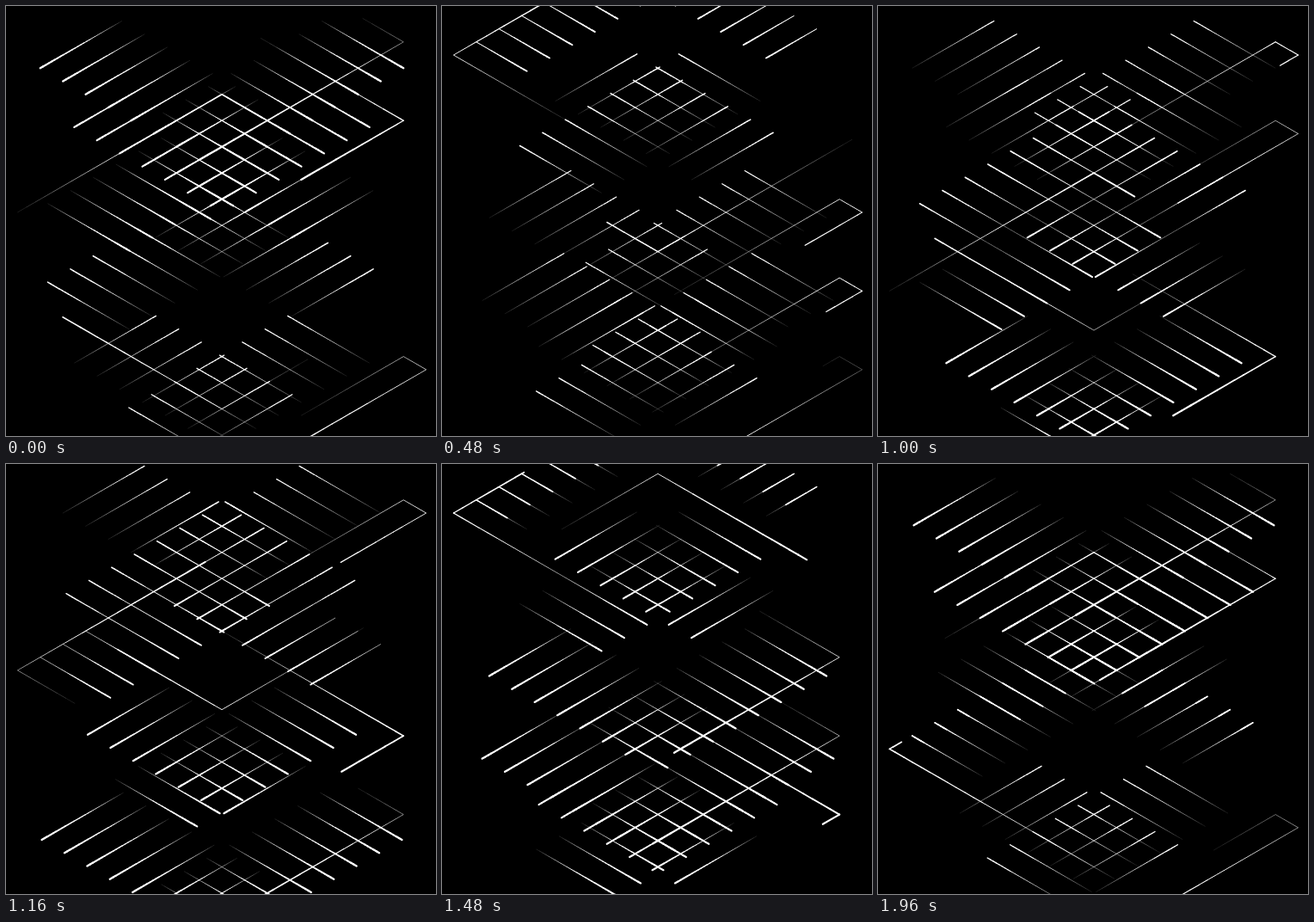
These frames come from a looping animation (500 px wide and 500 px high, 2 s). An HTML page with a canvas:

```html
<!DOCTYPE html>
<html>
<head>
<meta charset="utf-8">
<style>
html, body { margin: 0; width: 100%; height: 100%; overflow: hidden; background: #000; }
canvas { display: block; }
</style>
</head>
<body>
<canvas id="stage" width="500" height="500"></canvas>
<script>
const ctx = document.getElementById('stage').getContext('2d');
const LOOP = 2000, STEP = 40, LAG = 200;
const UX = 26.4, UY = 15.24, X0 = 251, Y0 = 41.8;
const DASH = 0.2, PIECES = 28;

// Each diamond spans -2..16 on two oblique axes (a: down-right, b: down-left).
const project = ([a, b], row) => [X0 + (a - b) / 2 * UX, Y0 + ((a + b) / 2 + 6 * row) * UY];

function makePath(points) {
  const at = [0];
  for (let i = 1; i < points.length; i++) {
    const [a, b] = points[i], [c, d] = points[i - 1];
    at.push(at[i - 1] + Math.abs(a - c) + Math.abs(b - d));
  }
  return { points, at, length: at[at.length - 1] };
}

// Rays run to the far side and back; the border is one long closed circuit.
const paths = [makePath([[14, 16], [14, -2], [-2, -2], [-2, 16], [16, 16], [16, -2], [14, -2], [14, 16]])];
for (let j = 0; j <= 14; j += 2) {
  paths.push(makePath([[16, j], [-2, j], [16, j]]));
  if (j < 14) paths.push(makePath([[j, 16], [j, -2], [j, 16]]));
}

function pointAt({ points, at }, s) {
  let i = 1;
  while (i < at.length - 1 && s > at[i]) i++;
  const k = (s - at[i - 1]) / (at[i] - at[i - 1]);
  return points[i].map((v, n) => points[i - 1][n] + (v - points[i - 1][n]) * k);
}

// A dash that tapers from its thick trailing end to a hairline.
function drawDash(path, row, e) {
  const from = (1 - DASH) * e * path.length, size = DASH * path.length;
  const stops = path.at.filter(s => s > from && s < from + size);
  for (let i = 0; i <= PIECES; i++) stops.push(from + size * i / PIECES);
  stops.sort((p, q) => p - q);
  const thick = 2.3 - 1.15 * e;
  for (let i = 1; i < stops.length; i++) {
    const q = ((stops[i] + stops[i - 1]) / 2 - from) / size;
    ctx.lineWidth = thick * (1 - q) + 0.08;
    ctx.lineCap = ctx.lineWidth > 1 ? 'round' : 'butt';
    ctx.beginPath();
    ctx.moveTo(...project(pointAt(path, stops[i - 1]), row));
    ctx.lineTo(...project(pointAt(path, stops[i]), row));
    ctx.stroke();
  }
}

function draw(time) {
  ctx.fillStyle = '#000';
  ctx.fillRect(0, 0, 500, 500);
  ctx.strokeStyle = '#fff';
  for (let row = -1; row <= 3; row++) {
    const phase = (time + (row + 1) * LAG) % LOOP;
    const p = Math.min(phase, LOOP - phase) / (LOOP / 2);
    const e = p * p * (3 - 2 * p);
    for (const path of paths) drawDash(path, row, e);
  }
}

const start = performance.now();
let shown = -1;
function tick() {
  const time = Math.floor((performance.now() - start) % LOOP / STEP) * STEP;
  if (time !== shown) draw(shown = time);
  requestAnimationFrame(tick);
}
tick();
</script>
</body>
</html>
```
